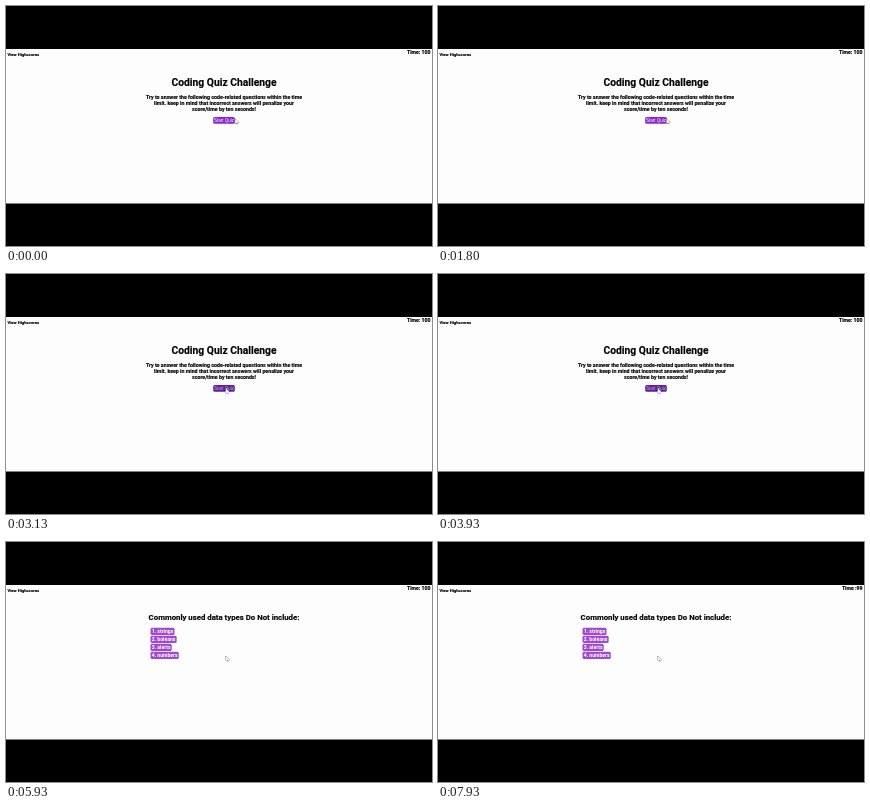
Animation, 426 px wide and 240 px high, one loop 8000 ms. Source, as an HTML page with a canvas:

```html
<!DOCTYPE html>
<html lang="en">
<head>
<meta charset="utf-8">
<title>Coding Quiz Challenge</title>
<style>
  html, body { margin: 0; width: 100%; height: 100%; overflow: hidden; background: #000; }
  canvas { display: block; width: 100vw; height: 100vh; }
</style>
</head>
<body>
<canvas id="stage" width="426" height="240"></canvas>
<script>
const ctx = document.getElementById('stage').getContext('2d');
const LOOP = 8000, QUESTION_AT = 4270, TICK_AT = 6930;
const MID = 218;
const OPTIONS = ['strings', 'boleans', 'alerts', 'numbers'];
const INTRO = [
  'Try to answer the following code-related questions within the time',
  'limit. keep in mind that incorrect answers will penalize your',
  'score/time by ten seconds!'
];

function setFont(size, family = 'Roboto', weight = 'bold') {
  ctx.font = `${weight} ${size}px ${family}, sans-serif`;
}

function text(str, x, y, align = 'left', color = '#000') {
  ctx.textAlign = align;
  ctx.fillStyle = color;
  ctx.fillText(str, x, y);
}

// Heavy black lettering
function heavy(str, x, y, size, align) {
  setFont(size);
  text(str, x, y, align);
  ctx.strokeStyle = '#000';
  ctx.lineWidth = 0.15;
  ctx.strokeText(str, x, y);
}

function button(x, y, w, h, color) {
  ctx.fillStyle = color;
  ctx.beginPath();
  ctx.roundRect(x, y, w, h, 1.5);
  ctx.fill();
}

// Eased progress from 0 to 1
function ease(t, start, end) {
  const k = Math.min(1, Math.max(0, (t - start) / (end - start)));
  return k * k * (3 - 2 * k);
}

function drawPointer(x, y, hover) {
  ctx.beginPath();
  if (hover) {
    ctx.roundRect(x, y, 1.2, 3.5, 0.6);
    ctx.roundRect(x - 0.5, y + 2, 3.3, 3, 1);
  } else {
    ctx.moveTo(x, y);
    ctx.lineTo(x, y + 4.6);
    ctx.lineTo(x + 3.2, y + 3.3);
    ctx.closePath();
    ctx.moveTo(x + 1.4, y + 3.8);
    ctx.lineTo(x + 2.2, y + 5.2);
  }
  ctx.strokeStyle = '#444';
  ctx.lineWidth = 0.7;
  ctx.stroke();
  ctx.fillStyle = '#fff';
  ctx.fill();
}

function drawIntro(hover) {
  heavy('Coding Quiz Challenge', MID, 80.3, 10.3, 'center');
  INTRO.forEach((line, i) => heavy(line, MID, 93 + i * 6, 5.25, 'center'));
  button(207.2, 111, 21.6, 6.8, hover ? '#5c2196' : '#8a27c4');
  setFont(4.5, '"Liberation Sans"', 'normal');
  text('Start Quiz', MID, 116, 'center', hover ? '#cda8e2' : '#fff');
}

function drawQuestion() {
  heavy('Commonly used data types Do Not include:', MID, 78, 7.8, 'center');
  setFont(5.1);
  OPTIONS.forEach((word, i) => {
    const label = `${i + 1}. ${word}`;
    const y = 85.8 + i * 8;
    button(144.5, y, ctx.measureText(label).width + 2.4, 7.3, '#a04bcb');
    text(label, 145.7, y + 5.4, 'left', '#fff');
  });
}

function draw(t) {
  ctx.fillStyle = '#000';
  ctx.fillRect(0, 0, 426, 240);
  ctx.fillStyle = '#fdfdfe';
  ctx.fillRect(0, 43, 426, 154.5);
  heavy('View Highscores', 1.5, 50, 4.2);
  heavy(t < TICK_AT ? 'Time: 100' : 'Time :99', 424.5, 48.3, 5.2, 'right');

  const x = 229.3 - 7 * ease(t, 1700, 2200) - 2.3 * ease(t, 2500, 2950);
  const y = 113 + 1.3 * ease(t, 1700, 2950);
  const intro = t < QUESTION_AT;
  const hover = intro && x < 228.5;
  if (intro) drawIntro(hover); else drawQuestion();
  drawPointer(x, y, hover);
}

function frame() {
  draw(performance.now() % LOOP);
  requestAnimationFrame(frame);
}
frame();
</script>
</body>
</html>
```
